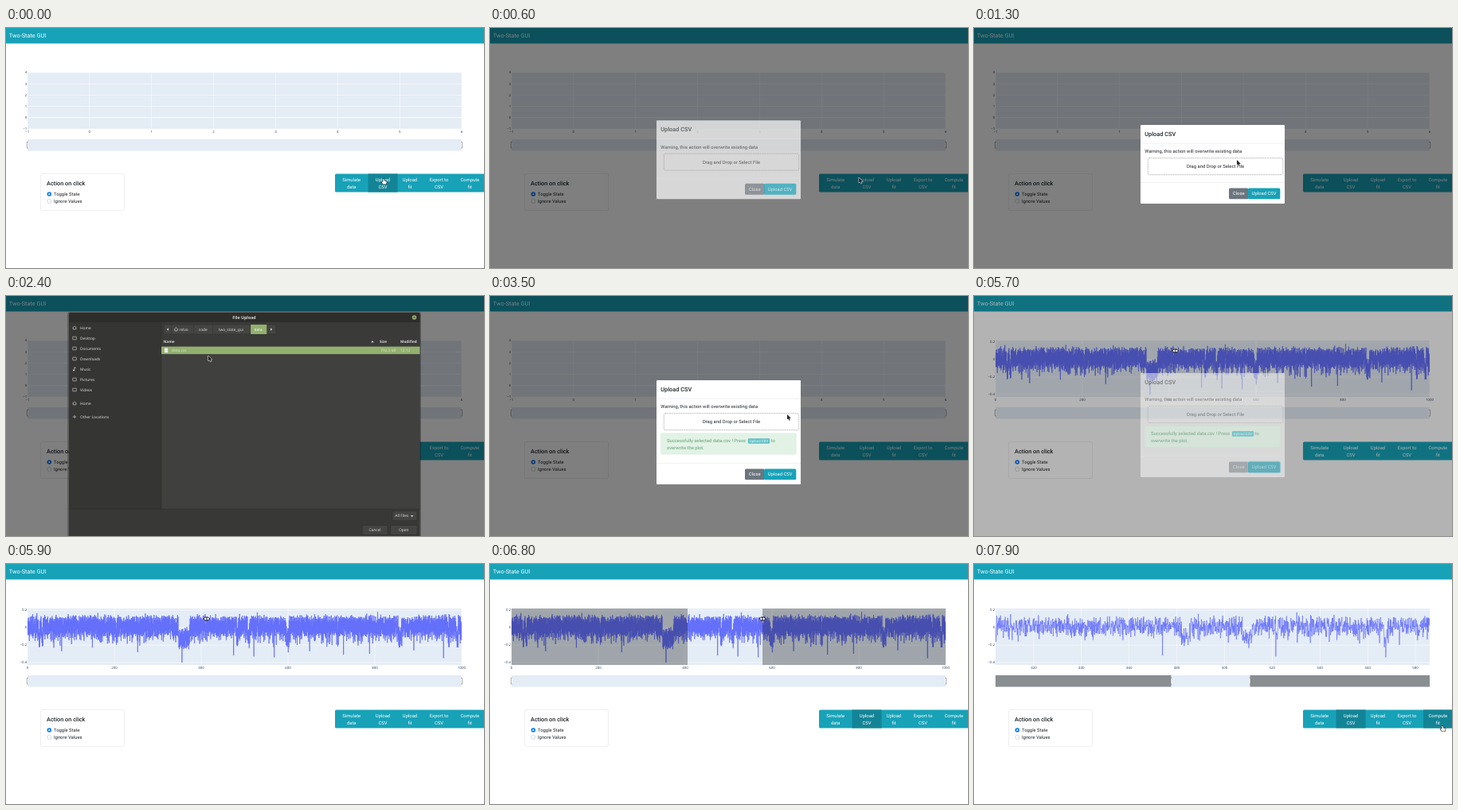
An HTML page with a canvas for the animation above (8000 ms loop, 600 px wide and 302 px high).

```html
<!DOCTYPE html>
<html lang="en">
<head>
<meta charset="utf-8">
<title>Two-State GUI</title>
<style>
html, body { margin: 0; width: 100%; height: 100%; overflow: hidden; background: #fff; }
canvas { display: block; width: 600px; height: 302px; }
</style>
</head>
<body>
<canvas id="stage"></canvas>
<script>
const W = 600, H = 302, LOOP = 8000;
const canvas = document.getElementById('stage');
const dpr = window.devicePixelRatio || 1;
canvas.width = W * dpr;
canvas.height = H * dpr;
const c = canvas.getContext('2d');

const ROBOTO = 'Roboto, sans-serif', OPEN = '"Open Sans", sans-serif', NOTO = '"Noto Sans", sans-serif';
const BODY = '5.87px ' + ROBOTO, HEAD = '500 7.33px ' + ROBOTO;
const TEAL = '#17a2b8', TEAL_DARK = '#138496', PLOT_BG = '#e4ecf5';
const PLOT = { x: 27, y: 56, w: 545, h: 71 };

const clamp = v => Math.max(0, Math.min(1, v));
const ramp = (t, a, b) => clamp((t - a) / (b - a));
const smooth = k => k * k * (3 - 2 * k);

function rect(x, y, w, h, fill) {
  c.fillStyle = fill;
  c.fillRect(x, y, w, h);
}
function round(x, y, w, h, r, fill, stroke, lw = 0.5) {
  c.beginPath();
  c.roundRect(x, y, w, h, r);
  if (fill) { c.fillStyle = fill; c.fill(); }
  if (stroke) { c.strokeStyle = stroke; c.lineWidth = lw; c.stroke(); }
}
function text(s, x, y, font, fill, align = 'left') {
  c.font = font;
  c.fillStyle = fill;
  c.textAlign = align;
  c.fillText(s, x, y);
}
function disc(x, y, r, fill, stroke, lw = 0.5) {
  c.beginPath();
  c.arc(x, y, r, 0, 7);
  if (fill) { c.fillStyle = fill; c.fill(); }
  if (stroke) { c.strokeStyle = stroke; c.lineWidth = lw; c.stroke(); }
}
function poly(points, fill, stroke, lw = 0.5) {
  c.beginPath();
  points.forEach(([x, y]) => c.lineTo(x, y));
  c.closePath();
  if (stroke) { c.strokeStyle = stroke; c.lineWidth = lw; c.lineJoin = 'round'; c.stroke(); }
  if (fill) { c.fillStyle = fill; c.fill(); }
}

// Two-state signal: long dips, short random visits to the low state, deep spikes.
const DIPS = [[26, 29], [33, 36], [59, 60.5], [204, 206], [348, 374], [482, 485.2], [507.5, 511.5],
  [566.8, 568.3], [596, 603], [714, 715], [854, 862], [969, 971], [988, 992]];
const SPIKES = { 356: -0.4, 474: -0.32, 521.5: -0.33, 567.6: -0.34, 728: -0.31, 788: -0.3,
  958: -0.35, 78: -0.27, 254: -0.28, 650: -0.27, 890: -0.26 };
const signal = makeSignal();

function makeSignal() {
  let seed = 20;
  const rnd = () => (seed = (seed * 16807) % 2147483647) / 2147483647;
  const out = [];
  let low = 0;
  for (let i = 0; i <= 10000; i++) {
    const t = i / 10;
    const size = rnd() < 0.02 ? 0.18 : 0.135;
    const noise = (rnd() + rnd() - 1) * size;
    if (low > 0) low--;
    else if (rnd() < 0.07) low = 1 + Math.floor(rnd() * 2);
    const dip = DIPS.some(([a, b]) => t >= a && t <= b);
    out.push((dip ? -0.12 : low ? -0.08 : 0.02) + noise);
  }
  for (const t in SPIKES) out[Math.round(t * 10)] = SPIKES[t];
  return out;
}

// Joins the highest and lowest value of every `stride` samples.
function tracePath(from, to, stride) {
  const p = new Path2D(), px = PLOT.w / (to - from);
  const yOf = v => 80 - v * 110;
  const last = to * 10;
  for (let i = from * 10; i <= last; i += stride) {
    const part = signal.slice(i, Math.min(i + stride, last + 1));
    const x = PLOT.x + (i / 10 - from) * px;
    p.lineTo(x, yOf(Math.max(...part)));
    if (stride > 1) p.lineTo(x + stride * px / 20, yOf(Math.min(...part)));
  }
  return p;
}
const VIEWS = {
  full: { from: 0, to: 1000, step: 200, start: 0, path: tracePath(0, 1000, 12), lw: 0.8 },
  zoom: { from: 404, to: 586, step: 20, start: 420, path: tracePath(404, 586, 1), lw: 0.65 }
};

// Pointer stops: time, x, y
const STOPS = [[0, 474, 190], [500, 474, 190], [1100, 330, 166], [1600, 330, 166], [2100, 330, 74],
  [2400, 254, 75], [3150, 254, 75], [3500, 373, 149], [3800, 372, 212], [4300, 365, 225],
  [5000, 365, 225], [5500, 253, 69], [6450, 250, 69], [6850, 346, 69], [7000, 346, 69],
  [7350, 452, 95], [7850, 588, 204], [8000, 588, 204]];
function pointer(t) {
  const i = STOPS.findIndex(s => s[0] > t);
  const a = STOPS[i - 1], b = STOPS[i], k = smooth(ramp(t, a[0], b[0]));
  return [a[1] + (b[1] - a[1]) * k, a[2] + (b[2] - a[2]) * k];
}
const inside = ([px, py], x, y, w, h) => px >= x && px <= x + w && py >= y && py <= y + h;

function drawHandle(x, side) {
  c.beginPath();
  c.moveTo(x + side * 0.8, 143.5);
  c.lineTo(x - side * 0.6, 143.5);
  c.lineTo(x - side * 0.6, 151);
  c.lineTo(x + side * 0.8, 151);
  c.fillStyle = '#fff';
  c.fill();
  c.strokeStyle = '#555';
  c.lineWidth = 0.5;
  c.stroke();
}

function drawPlot(t) {
  const { x, y, w, h } = PLOT;
  const font = '4.4px ' + OPEN, ink = '#2a3f5f';
  rect(x, y, w, h, PLOT_BG);
  const xLine = (px, label) => {
    rect(px - 0.25, y, 0.5, h, '#fff');
    text(label, px, 131, font, ink, 'center');
  };
  const yLine = (py, label, lw = 0.5) => {
    rect(x, py - lw / 2, w, lw, '#fff');
    text(label, x - 0.7, py + 0.3, font, ink, 'right');
  };
  const zoomed = t >= 6900;
  if (t < 4750) {
    for (let n = -1; n <= 6; n++) xLine(x + (n + 1) * w / 7, String(n).replace('-', '−'));
    for (let n = -1; n <= 4; n++) yLine(y + (4 - n) * h / 5, String(n).replace('-', '−'), n ? 0.5 : 0.9);
  } else {
    const v = zoomed ? VIEWS.zoom : VIEWS.full;
    for (let n = v.start; n <= v.to; n += v.step) xLine(x + (n - v.from) * w / (v.to - v.from), n);
    ['0.2', '0', '−0.2', '−0.4'].forEach((s, i) => yLine(58 + i * 22, s, i === 1 ? 0.9 : 0.5));
    c.save();
    c.beginPath();
    c.rect(x, y, w, h);
    c.clip();
    c.strokeStyle = '#636efa';
    c.lineWidth = v.lw;
    c.lineJoin = 'round';
    c.stroke(v.path);
    c.restore();
  }

  if (t >= 6450 && !zoomed) {
    const end = Math.max(249, pointer(t)[0]);
    const k = 0.3 * ramp(t, 6450, 6650);
    rect(x, y, 248 - x, h, `rgba(0,0,0,${k})`);
    rect(end, y, x + w - end, h, `rgba(0,0,0,${k})`);
    [247, end].forEach(px => round(px, 64, 1, 10, 0, '#fff', '#444', 0.3));
  }

  rect(x, 140, w, 14.5, PLOT_BG);
  let a = x, b = x + w;
  if (zoomed) {
    a = 247.5;
    b = 346.5;
    rect(x, 140, a - x, 14.5, '#898e91');
    rect(b, 140, x + w - b, 14.5, '#898e91');
  }
  drawHandle(a, 1);
  drawHandle(b, -1);
}

function drawPage(t, dim, at) {
  rect(0, 0, W, H, '#fff');
  rect(0, 0, W, 19.5, TEAL);
  text('Two-State GUI', 3.8, 9.8, '7.33px ' + ROBOTO, '#fff');
  drawPlot(t);

  round(43.5, 183.5, 105, 46, 1.5, '#fff', '#dfdfdf');
  text('Action on click', 51, 196.2, HEAD, '#212529');
  disc(54.3, 209, 2.8, '#0b7bff');
  disc(54.3, 209, 1.1, '#fff');
  disc(54.3, 218, 2.6, '#fff', '#adb5bd');
  text('Toggle State', 60, 209, BODY, '#212529');
  text('Ignore Values', 60, 218, BODY, '#212529');

  round(413, 183.5, 195, 23, 1.5, TEAL);
  const buttons = [[413, 41.5, 'Simulate', 'data', 433.7], [454.5, 37, 'Upload', 'CSV', 473],
    [491.5, 31.5, 'Upload', 'fit', 507], [523, 41, 'Export to', 'CSV', 543.5], [564, 37, 'Compute', 'fit', 582.3]];
  buttons.forEach(([x, w, top, low, mid], i) => {
    const hover = dim === 0 && inside(at, x, 183.5, w, 23);
    const focus = i === 1 && (t >= 100 && t < 500 || t >= 6000);
    if (hover || focus) rect(x, 183.5, w, 23, i === 1 && t >= 100 && t < 300 ? '#117a8b' : TEAL_DARK);
    text(top, mid, 190.9, BODY, '#fff', 'center');
    text(low, mid, 199.9, BODY, '#fff', 'center');
  });
}

function drawModal(t, show, at) {
  const grown = t >= 3200;
  const h = grown ? 131 : 99, top = 171.5 - h / 2;
  c.save();
  c.globalAlpha = show;
  c.translate(0, top - (1 - show) * 18);
  round(209, 0, 181, h, 1, '#fff');
  text('Upload CSV', 214.3, 11.8, HEAD, '#212529');
  rect(209, 22.8, 181, 0.5, '#dee2e6');
  text('Warning, this action will overwrite existing data', 214.3, 33.7, BODY, '#212529');
  c.setLineDash([1.1, 1.1]);
  round(218.3, 41.7, 169.5, 21, 1.8, null, '#444', 0.5);
  c.setLineDash([]);
  text('Drag and Drop or Select File', 303, 52.7, BODY, '#212529', 'center');

  if (grown) {
    c.globalAlpha = show * ramp(t, 3250, 3650);
    round(214.3, 66.7, 170, 26.5, 1.5, '#d1ecd8', '#c3e6cb');
    const ink = '#1e6b33';
    text('Successfully selected data.csv ! Press', 222, 76, BODY, ink);
    round(323.8, 73.2, 27.4, 6.6, 1.3, TEAL);
    text('Upload CSV', 337.5, 76.6, 'bold 4.4px ' + ROBOTO, '#fff', 'center');
    text('to', 352.7, 76, BODY, ink);
    text('overwrite the plot.', 222, 84.9, BODY, ink);
    c.globalAlpha = show;
  }

  const foot = h - 26.5, by = h - 19.5;
  rect(209, foot, 181, 0.5, '#dee2e6');
  round(320, by, 24.5, 13.8, 1.5, '#6c757d');
  const hover = inside(at, 344, top + by, 40, 14), focus = t >= 4400;
  if (focus) round(343, by - 1, 42.3, 15.8, 2, '#8bd1dc');
  round(344, by, 40.3, 13.8, 1.5, hover || focus ? TEAL_DARK : TEAL);
  text('Close', 332.2, by + 7, BODY, '#fff', 'center');
  text('Upload CSV', 364.1, by + 7, BODY, '#fff', 'center');
  c.restore();
}

function drawFiles(t, show) {
  const font = '4.85px ' + NOTO, bold = 'bold 4.7px ' + NOTO, ink = '#dadada', green = '#92b06e';
  c.save();
  c.globalAlpha = show;
  round(77, 20, 444, 290, 3, 'rgba(0,0,0,.25)');
  round(79, 21, 440.5, 290, 2, '#383836');
  round(79, 21, 440.5, 12, [2, 2, 0, 0], '#2d2d2b');
  text('File Upload', 299, 27.3, 'bold 5.3px ' + NOTO, ink, 'center');
  disc(512.5, 27, 2.8, green);
  c.strokeStyle = '#2d2d2b';
  c.lineWidth = 0.6;
  c.beginPath();
  c.moveTo(511.5, 26); c.lineTo(513.5, 28);
  c.moveTo(513.5, 26); c.lineTo(511.5, 28);
  c.stroke();

  rect(79, 33, 116, 235, '#353533');
  rect(195, 33, 324.5, 19, '#3a3a38');
  rect(195, 52, 324.5, 216, '#40403e');
  rect(194.7, 33, 0.5, 235, '#2b2b29');
  rect(79, 267.7, 440.5, 0.5, '#2b2b29');

  const places = [['Home', 40], ['Desktop', 53], ['Documents', 66], ['Downloads', 79], ['Music', 92],
    ['Pictures', 105], ['Videos', 118], ['Home', 135], ['Other Locations', 152]];
  places.forEach(([name, y], i) => {
    text(name, 93, y + 0.3, font, ink);
    if (name === 'Home') house(86, y);
    else if (i === 8) {
      rect(83.8, y - 0.3, 4.4, 0.6, ink);
      rect(85.7, y - 2.2, 0.6, 4.4, ink);
    } else if (i === 4) {
      disc(85, y + 1.5, 1, ink);
      rect(85.6, y - 2.2, 0.6, 3.8, ink);
      rect(85.6, y - 2.2, 2.3, 0.7, ink);
    } else round(83.7, y - 1.8, 4.6, 3.6, 0.4, null, ink, 0.6);
  });

  round(198, 36, 141, 12, 1.5, '#444442', '#2e2e2c');
  rect(307, 36, 20.5, 12, green);
  [207.5, 235.5, 259.5, 306.7, 327.5].forEach(x => rect(x, 36, 0.4, 12, '#2e2e2c'));
  poly([[204, 40.2], [201.8, 42], [204, 43.8]], ink);
  poly([[332, 40.2], [334.2, 42], [332, 43.8]], ink);
  house(213.5, 42);
  text('relvo', 217.5, 42.3, font, ink);
  text('code', 247.3, 42.3, font, ink, 'center');
  text('two_state_gui', 282.3, 42.3, font, ink, 'center');
  text('data', 316.6, 42.3, font, '#fff', 'center');

  rect(195, 52, 324.5, 10.8, '#3a3a38');
  text('Name', 197.5, 57.5, bold, ink);
  poly([[458.2, 58.4], [461.8, 58.4], [460, 56]], ink);
  text('Size', 469, 57.5, bold, ink);
  text('Modified', 495, 57.5, bold, ink);
  rect(195, 63.7, 324.5, 9.4, green);
  round(198.8, 65.5, 4.4, 5.8, 0.4, '#eee', '#b5c4a3', 0.3);
  const row = t < 2650 ? '#d9e4cb' : '#fff';
  text('data.csv', 208, 68.7, font, row);
  text('792.5 kB', 489.5, 68.7, font, row, 'right');
  text('12:12', 495, 68.7, font, row);

  const button = (x, y, w, h, label, on) => {
    round(x, y, w, h, 1.3, on ? '#5a5a57' : '#444442', '#2b2b29');
    text(label, x + w / 2, y + h / 2 + 0.3, font, ink, 'center');
  };
  button(485, 270.7, 31, 12, '', false);
  text('All Files', 488.3, 277, font, ink);
  poly([[508, 276], [511.4, 276], [509.7, 278.2]], ink);
  button(447, 288.5, 32, 12, 'Cancel', false);
  button(482.5, 288.5, 33.5, 12, 'Open', t >= 2850);
  c.restore();

  function house(x, y) {
    poly([[x - 2.4, y], [x, y - 2.2], [x + 2.4, y], [x + 1.6, y], [x + 1.6, y + 2],
      [x - 1.6, y + 2], [x - 1.6, y]], null, ink, 0.6);
  }
}

function drawPointer(kind, [x, y]) {
  c.save();
  c.translate(x, y);
  if (kind === 'arrow') {
    poly([[0, 0], [0, 6.6], [1.5, 5.3], [2.6, 7.8], [3.8, 7.2], [2.7, 4.9], [4.7, 4.8]], '#222', '#fff', 1);
  } else if (kind === 'resize') {
    poly([[-3.5, 0], [-1, -2], [-1, -0.6], [1, -0.6], [1, -2], [3.5, 0],
      [1, 2], [1, 0.6], [-1, 0.6], [-1, 2]], '#fff', '#111', 1.5);
  } else {
    poly([[-0.7, 0], [0.5, 0], [0.7, 2.3], [3.6, 2.9], [3.7, 4.5], [2.9, 6.5], [-0.7, 6.5],
      [-2.6, 3.8], [-1.9, 3.1], [-0.7, 4]], '#fff', '#222', 1.2);
  }
  c.restore();
}

function pointerKind(t, at, modal) {
  if (modal && t < 5500) return t > 4000 && inside(at, 344, 217, 40, 15) ? 'hand' : 'arrow';
  if (inside(at, 413, 183, 190, 24)) return 'hand';
  return t > 5700 && inside(at, PLOT.x, PLOT.y, PLOT.w, PLOT.h) ? 'resize' : 'arrow';
}

function draw(t) {
  const at = pointer(t);
  const dim = smooth(ramp(t, 200, 550)) * (1 - ramp(t, 5600, 5850));
  const files = ramp(t, 1350, 1600) * (1 - ramp(t, 3050, 3200));
  c.setTransform(dpr, 0, 0, dpr, 0, 0);
  c.textBaseline = 'middle';
  c.textRendering = 'geometricPrecision';
  drawPage(t, dim, at);
  if (dim > 0) rect(0, 0, W, H, `rgba(0,0,0,${dim * 0.5})`);
  const modal = smooth(ramp(t, 350, 750)) * (1 - ramp(t, 5600, 5800));
  if (modal > 0) drawModal(t, modal, at);
  if (files > 0) drawFiles(t, files);
  drawPointer(pointerKind(t, at, dim > 0), at);
}

const began = performance.now();
function tick() {
  draw((performance.now() - began) % LOOP);
  requestAnimationFrame(tick);
}
tick();
</script>
</body>
</html>
```
